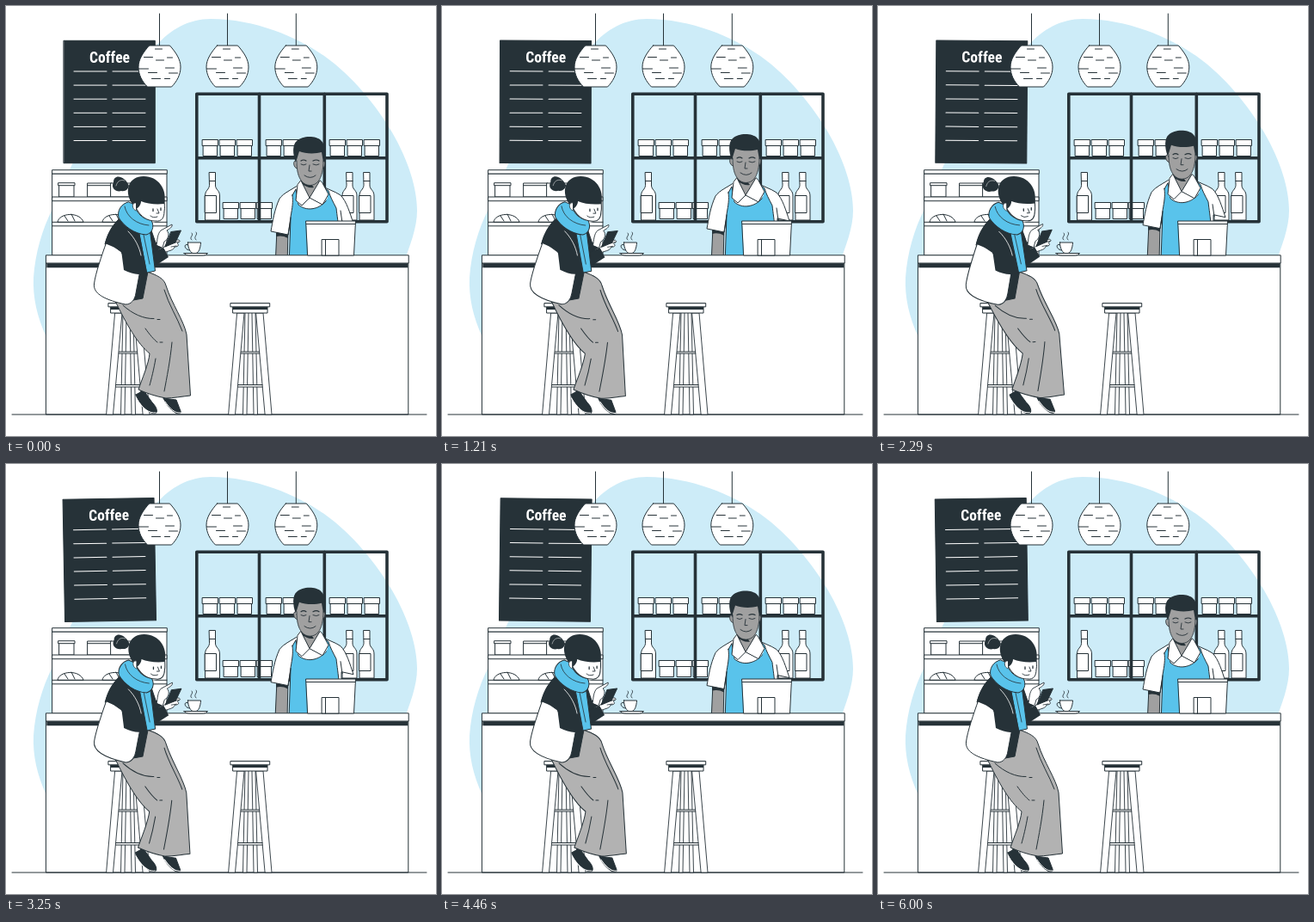
An HTML page with a canvas for the animation above (6040 ms loop, 500x500 px).

```html
<!DOCTYPE html>
<html lang="en">
<head>
<meta charset="utf-8">
<title>Coffee bar</title>
<style>
html, body { margin: 0; width: 100%; height: 100%; overflow: hidden; background: #fff; }
canvas { display: block; width: 500px; height: 500px; }
</style>
</head>
<body>
<canvas id="stage"></canvas>
<script>
const INK = '#263238', BLUE = '#59c3eb', PALE = '#cdecf8', SKIN = '#a0a0a0', CLOTH = '#b2b2b2', WHITE = '#fff';
const LOOP = 6040;
const canvas = document.getElementById('stage');
const ratio = window.devicePixelRatio || 1;
canvas.width = canvas.height = 500 * ratio;
const ctx = canvas.getContext('2d');
ctx.lineJoin = ctx.lineCap = 'round';

const cache = {};
function shape(d, fill, stroke = INK, width = 1) {
  const path = cache[d] || (cache[d] = new Path2D(d));
  if (fill) { ctx.fillStyle = fill; ctx.fill(path); }
  if (stroke) { ctx.strokeStyle = stroke; ctx.lineWidth = width; ctx.stroke(path); }
}
const line = (d, color = INK, width = 1) => shape(d, null, color, width);
function box(x, y, w, h, fill = WHITE, stroke = INK, width = 1) {
  shape(`M${x} ${y}h${w}v${h}h${-w}Z`, fill, stroke, width);
}
function at(x, y, draw) {
  ctx.save();
  ctx.translate(x, y);
  draw();
  ctx.restore();
}
function tilt(x, y, deg, draw) {
  ctx.save();
  ctx.translate(x, y);
  ctx.rotate(deg * Math.PI / 180);
  ctx.translate(-x, -y);
  draw();
  ctx.restore();
}

const ease = s => s * s * (3 - 2 * s);
// Rests at 0, swings to +1, then -1, and back every three seconds.
function sway(t) {
  if (t < 0) return 0;
  const p = t % 3000 / 3000;
  if (p < .25) return ease(p * 4);
  if (p < .75) return 1 - 2 * ease((p - .25) * 2);
  return ease((p - .75) * 4) - 1;
}
const lift = t => 8.5 * ease(1 - Math.abs(t % 6000 / 3000 - 1));

function blob() {
  shape('M238 15C290 15 338 36 370 58C404 82 432 118 449 147C468 180 478 212 478 238C478 258 470 278 460 305L440 400H55L47 385C36 362 31 338 32 316C34 287 42 260 54 236C61 219 68 203 76 186C100 140 130 75 174 47C191 27 213 15 238 15Z', PALE, null);
}

function lamp() {
  line('M0 9V46');
  shape('M-12 46H12C19 54 24.5 62 24.5 71C24.5 80 20 88 14 94H-14C-20 88 -24.5 80 -24.5 71C-24.5 62 -19 54 -12 46Z', WHITE);
  line('M-5 50H3M-18 59.5H-8M-4 63H5M9 60H15M-24 73H-13M7 72H17M-13 77.5H-3M11 78H21M-9 84.5H1M6 84.5H12');
}

let titleSize = 0;
function title() {
  const face = px => `bold ${px}px "Roboto Condensed", "Open Sans Condensed", Roboto, sans-serif`;
  if (!titleSize) {
    ctx.font = face(20);
    titleSize = Math.min(20, 20 * 47 / ctx.measureText('Coffee').width);
  }
  ctx.font = face(titleSize);
  ctx.textAlign = 'center';
  ctx.fillStyle = WHITE;
  ctx.fillText('Coffee', 120.5, 65.5);
}

function board() {
  box(67.3, 40.3, 106, 142.4, INK);
  title();
  for (let i = 0; i < 6; i++) {
    line(`M79 ${76 + i * 16.1}h38M124 ${76 + i * 16.1}h38`, WHITE);
  }
}

function jar(x, y) {
  box(x + 1, y + 6, 16, 13);
  box(x, y, 18, 7);
}

function bottle(x) {
  at(x, 0, () => {
    shape('M-3.5 193.5H3.5V209C4 214 8.5 214 8.5 221V249H-8.5V221C-8.5 214 -4 214 -3.5 209Z', WHITE);
    line('M-3.5 203.5H3.5');
    box(-8.5, 220.5, 13, 20);
  });
}

function shelves() {
  for (const x of [228.5, 248.5, 268.5, 302.5, 322.5, 342.5, 376.5, 396.5, 416.5]) jar(x, 155.5);
  for (const x of [252.5, 272.5, 291.5]) jar(x, 228.5);
  [240, 399.5, 419.5].forEach(bottle);
  line('M221.8 102.3H443V250.7H221.8ZM221.8 176.7H443M294.5 102V250M370.3 102V250', INK, 3.6);
}

function pastryCase() {
  box(54, 195, 133, 95);
  box(54, 190.7, 133.3, 4.3);
  box(62, 208, 17, 14);
  box(61, 205.7, 19, 3);
  box(95, 206, 28, 16);
  line('M95 208.7H123');
  box(122, 206, 28, 16);
  box(54, 222, 133, 4.7);
  for (const x of [60, 112]) {
    at(x, 0, () => {
      shape('M0 251C2 240 26 239 30 251Z', WHITE);
      line('M8 244L12 250M16 242L20 250');
    });
  }
  line('M54 251.3H187M54 255.8H187');
}

function barista() {
  shape('M315 260L313 304H327L328 260Z', SKIN);
  shape('M314 263L328 262V270C323 267 318 267 314 268Z', INK, null);
  shape('M340 208C332 214 323 217 318 224C312 237 310 251 308 262L328 266L331 248V304H390V250L404 253C400 241 396 227 389 220C382 215 372 213 366 208Z', WHITE);
  shape('M333 220L337 213L340 231C349 239 363 237 372 227L370 211L375 215C377 222 380 227 384 235C386 252 389 270 390 304H329L331 245C333 234 334 228 333 220Z', BLUE);
  shape('M338 208L344 200L364 200L368 208L374 223C366 237 346 238 338 227Z', WHITE, null);
  shape('M344 192V207L353 223L364 207V192Z', SKIN, null);
  shape('M343 190V206C348 210 353 212 358 211L346 196Z', INK, null);
  shape('M343 203L353 223L344 232L337 226L339 208Z', WHITE);
  shape('M365 203L353 223L368 231L375 219L368 206Z', WHITE);
  shape('M337 180C333 179 334 189 339 189M368 180C373 179 371 189 367 189', SKIN, INK, .8);
  shape('M338 165L338 183C338 193 340 199 344 204C349 210 358 210 363 204C367 199 369 190 369 182V165Z', SKIN, null);
  line('M338 180C338 192 340 199 344 204C349 210 358 210 363 204C367 199 369 190 369 180', INK, .8);
  shape('M337 182C333 172 333 161 338 157C345 150 361 151 366 156C372 161 372 172 369 182L367 170C360 172 348 172 341 169Z', INK, null);
  line('M343 180Q346 178 349 180M357 180Q361 178 364 180', INK, 1.2);
  line('M343 184Q346 186 349 184M357 184Q361 186 364 184M353 185L352 192H355M347 197Q354 202 360 197', INK, .9);
  line('M331 246L328 266M389 238L391 252');
}

function counter() {
  box(46.8, 299, 421, 176);
  box(47.3, 299.3, 420, 5, INK, null);
  box(46.8, 289.8, 421.4, 9.2);
  line('M7 475H489');
}

function register() {
  shape('M349 250H406.5L404.5 290H351Z', WHITE);
  line('M349.5 253.5H406');
  box(367.5, 271.5, 19.5, 18.5);
  line('M371.5 272V290');
}

function cup() {
  shape('M207 287.5H234.5C233 290 230 290 228 290H214C210 290 208 289 207 287.5Z', WHITE);
  line('M212 278C206 275 207 284 214 284');
  shape('M211.5 275H226.5C226 282 224 287 221 287.5H217C214 286 211.5 281 211.5 275Z', WHITE);
  line('M216 272C212 269 219 267 216 264M221 272C217 268 224 266 221 263', INK, .8);
}

function stool() {
  shape('M17 357L14.5 475H19L21 357M25 357L27 475H31.5L29 357', WHITE, INK, .9);
  box(6, 402, 35, 2);
  box(4, 440.5, 39, 2.5);
  shape('M8 357H16L5.5 475H-2ZM30 357H38L48 475H40.5Z', WHITE, INK, .9);
  box(3, 350, 40, 7);
  box(3, 350, 40, 3, INK, null);
  box(.3, 345.5, 45.4, 4.3);
}

function customer() {
  // Shoes
  shape('M151 452L160 447L170 461C176 467 177 473 173 474C166 474 155 463 151 452Z', INK);
  line('M151.5 456C158 467 166 474 174 473', WHITE, 1);
  shape('M183 456L198 458L203 471C204 474 201 475 197 473C191 469 186 463 183 456Z', INK);
  line('M185 460C191 469 197 474 203 473', WHITE, 1);
  // Trousers
  shape('M164 309C176 313 184 317 186 325C193 347 207 366 210 382L214.5 453C205 454 194 456 186 456C174 454 163 450 154 446C158 434 166 416 167 404C153 393 140 370 127 343Z', CLOTH);
  line('M136 348C147 358 160 364 172 363.5M176 364.5H179M162 375C167 382 172 388 176 391M179 391H182M174 410C172 422 169 434 167 441M193 391C191 412 187 432 184 448M184 330C189 347 199 362 205 378');
  // Coat, bag and arms
  shape('M131 248C122 257 118 267 115 277L136 291L148 342L159 340L165 309L173 302L177 284L168 258Z', INK);
  shape('M117 274C111 291 104 311 102.5 323C101 335 116 342 139 347C146 347 150 341 151 334L156 307C146 303 139 296 134 286Z', WHITE);
  shape('M131 248C122 256 117 267 115 276L134 284L137 307C147 312 157 314 163 309L189 292L183 281L160 290C156 280 151 265 141 255Z', INK, null);
  line('M142 262C150 270 155 280 157 290', WHITE, .8);
  shape('M168 279L175 275L181 281L168 288Z', INK);
  // Hands and phone
  shape('M175 278C176 272 176 265 180 261L193 254C194 257 190 259 187 261C191 265 188 272 184 274L182 281Z', WHITE, INK, .9);
  shape('M183 281C189 275 193 271 201 272C204 274 200 275 199 276C202 278 200 280 196 280C195 284 191 284 186 286Z', WHITE, INK, .9);
  shape('M192 262.5L203.5 261L197 275L185 280Z', INK);
  line('M193 276L201 274M192 280L198 279', INK, .8);
  // Scarf
  shape('M154 258L167 258L173.5 308L164 310Z', BLUE);
  line('M160 266L167 300', INK, .8);
  shape('M147 226L178 229C184 238 184 247 177 250C170 253 163 252 159 249L149 246Z', WHITE, null);
  shape('M142 228C134 230 129 238 131 246C137 256 149 265 163 266C170 264 173 257 169 249C160 248 153 243 149 231Z', BLUE);
  line('M138 233C140 245 152 254 166 255', INK, .8);
  // Head
  shape('M149 230C147 219 150 216 154 219L184 225C184 230 185 235 184 239C184 246 181 251 174 250C164 250 155 245 149 230Z', WHITE);
  shape('M143 209C138 197 125 195 125 205C121 212 129 217 134 215C139 216 142 213 143 209Z', INK, null);
  line('M138 203C132 201 129 205 128 209', WHITE, .5);
  shape('M146 229C137 214 143 198 160 198C177 198 188 213 184 230C174 231 164 230 157 227C157 231 154 235 151 236Z', INK, null);
  shape('M151 229C146 228 146 236 151 238', WHITE, INK, .8);
  line('M171 236V238.5M180 235V237.5', INK, 1.3);
  line('M176 236L178 241H175M168 244Q171 247 176 245', INK, .9);
}

function frame(now) {
  const t = now % LOOP;
  ctx.setTransform(ratio, 0, 0, ratio, 0, 0);
  ctx.fillStyle = WHITE;
  ctx.fillRect(0, 0, 500, 500);
  blob();
  shelves();
  tilt(120.3, 111.5, sway(t - 1000), board);
  for (const x of [178.5, 257.5, 337.3]) at(x, 0, lamp);
  pastryCase();
  at(0, -lift(t), barista);
  counter();
  register();
  cup();
  for (const x of [119, 261]) at(x, 0, stool);
  tilt(159, 336, sway(t), customer);
}

const start = performance.now();
function tick() {
  frame(performance.now() - start);
  requestAnimationFrame(tick);
}
tick();
</script>
</body>
</html>
```
